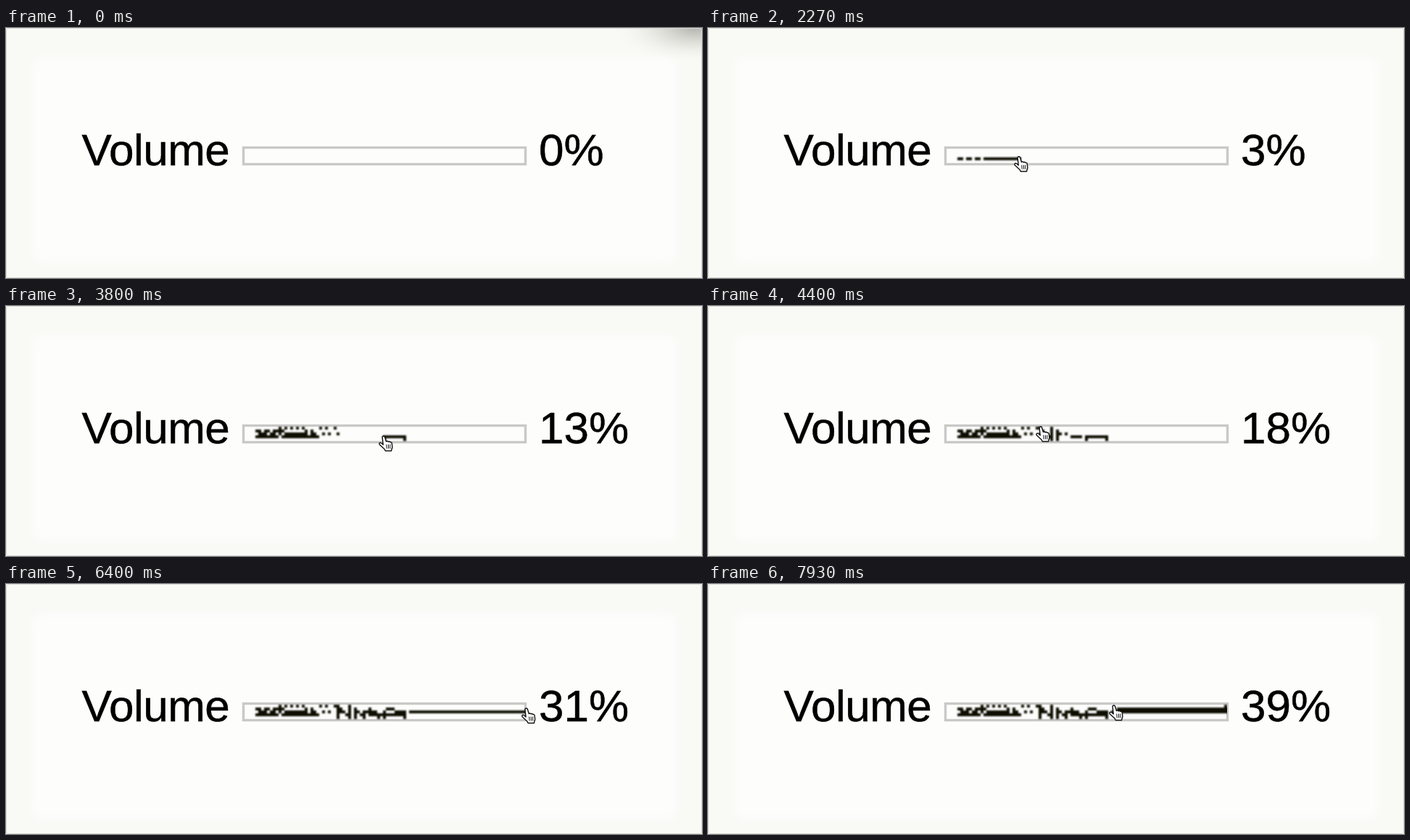
An HTML page for the animation above (8 s loop, 960x346 px).

```html
<!DOCTYPE html>
<html lang="en">
<head>
<meta charset="utf-8">
<title>Volume</title>
<style>
  html, body { margin: 0; width: 100%; height: 100%; overflow: hidden; background: #f9f9f6; }
  svg { display: block; width: 100%; height: 100%; }
  text { font: 62px "Liberation Sans", Arial, sans-serif; fill: #000; stroke: #000; stroke-width: .5; }
</style>
</head>
<body>
<svg viewBox="0 0 960 346">
  <defs>
    <filter id="soft"><feGaussianBlur stdDeviation="5"/></filter>
    <filter id="ink" filterUnits="userSpaceOnUse" x="320" y="160" width="404" height="36">
      <feGaussianBlur stdDeviation=".9"/>
    </filter>
    <radialGradient id="shade">
      <stop offset="0" stop-color="#b4b4b0"/>
      <stop offset=".45" stop-color="#dcdcd6" stop-opacity=".8"/>
      <stop offset="1" stop-color="#f4f4f0" stop-opacity="0"/>
    </radialGradient>
    <clipPath id="inside"><rect x="328" y="166" width="388" height="22"/></clipPath>
  </defs>
  <rect width="960" height="346" fill="#f9f9f6"/>
  <rect x="37" y="41" width="888" height="284" rx="12" fill="#fdfdfc" filter="url(#soft)"/>
  <ellipse id="corner" cx="950" cy="0" rx="112" ry="48" fill="url(#shade)"/>
  <rect x=".5" y=".5" width="959" height="345" rx="3" fill="none" stroke="#dcdcd6"/>
  <text x="104.5" y="190" letter-spacing="-.5">Volume</text>
  <rect x="327.5" y="165.5" width="389" height="23" fill="none" stroke="#c9c9c8" stroke-width="3.4"/>
  <g clip-path="url(#inside)"><path id="paint" fill="#080805" filter="url(#ink)"/></g>
  <text id="value" x="735" y="190">0%</text>
  <g id="hand" stroke="#111" stroke-width="1.4" stroke-linejoin="round" stroke-linecap="round">
    <path fill="#fff" d="M6 2q2-2 3.4 0l2 6.5q1.6-1.2 2.8.4q1.6-1 2.6.6q2-.6 2.4 1.4l.6 4.6q.2 2-.8 3.4l-.4 2.6h-8.4l-1-2.2-7-6.6q-1-2 1-2.4q1.4-.2 4 2.6z"/>
    <path fill="none" stroke-width="1" d="M11.8 13l.4 5M14.4 13l.2 5M16.8 13v5"/>
  </g>
</svg>
<script>
const LOOP = 8000;
const CELL = 4;
const $ = id => document.getElementById(id);
const keys = [[600, 905, -30]];
const stamps = [];

const snap = (v, origin) => origin + Math.round((v - origin) / CELL) * CELL;

// Moves the pointer; a gap fills grid cells that far apart.
function to(time, x, y, gap = 0) {
  const [t0, x0, y0] = keys[keys.length - 1];
  if (gap) {
    const n = Math.max(1, Math.round(Math.hypot(x - x0, y - y0) / gap));
    const w = gap > 9 ? 2 * CELL : CELL;
    for (let i = 0; i <= n; i++) {
      const k = i / n;
      const cx = snap(x0 + (x - x0) * k, 346), cy = snap(y0 + (y - y0) * k, 169);
      stamps.push({
        t: t0 + (time - t0) * k,
        d: `M${cx - CELL / 2} ${cy - CELL / 2}h${w}v${CELL}h${-w}z`
      });
    }
  }
  keys.push([time, x, y]);
}

// Scribbles to x between two heights.
function zig(time, x, top, bottom, turns, gap) {
  const [t0, x0] = keys[keys.length - 1];
  for (let i = 1; i <= turns; i++) {
    const k = i / turns;
    to(t0 + (time - t0) * k, x0 + (x - x0) * k, i % 2 ? top : bottom, gap);
  }
}

to(1150, 640, 60);
to(1600, 360, 174);
to(1730, 341, 180);
to(1850, 346, 181);
to(2130, 382, 181, 12);
to(2150, 389, 181);
to(2270, 428, 181, 3);
to(2340, 430, 180, 2);
to(2490, 390, 177, 3);
zig(2700, 347, 173, 179, 3, 3);
zig(2930, 381, 179, 172, 5, 3);
to(2960, 376, 169);
to(3020, 410, 169, 9);
zig(3090, 430, 179, 172, 3, 4);
to(3110, 434, 169);
to(3150, 452, 169, 9);
to(3170, 436, 177);
to(3215, 458, 177, 9);
to(3270, 514, 180);
to(3480, 550, 184);
to(3560, 550, 182, 3);
to(3800, 520, 183, 3);
to(3900, 503, 182, 4);
to(3990, 487, 175, 8);
to(4040, 481, 173);
to(4100, 481, 184, 3);
to(4190, 473, 169);
to(4280, 472, 183, 3);
to(4400, 458, 170, 4);
to(4490, 458, 184, 4);
to(4580, 473, 169);
to(4640, 481, 173);
zig(5020, 526, 183, 173, 4, 4);
to(5150, 550, 178, 3);
to(5270, 534, 181, 3);
to(5380, 558, 177);
to(5530, 606, 177, 3);
to(6380, 718, 177, 3);
to(6450, 714, 170, 3);
to(6500, 712, 173, 3);
to(6930, 584, 173, 3);
to(7150, 566, 173, 3);
to(7350, 536, 176);
to(7600, 575, 179);
to(7800, 605, 176);
to(7930, 559, 171);

const levels = [
  [1850, 0], [2270, 3], [3215, 11], [3480, 11], [4400, 18], [5380, 24],
  [5530, 25], [6380, 31], [6500, 31], [7150, 39]
];

function sample(list, t, column) {
  const i = list.findIndex(p => p[0] > t);
  if (i < 0) return list[list.length - 1][column];
  if (i === 0) return list[0][column];
  const a = list[i - 1], b = list[i];
  return a[column] + (b[column] - a[column]) * (t - a[0]) / (b[0] - a[0]);
}

function draw(t) {
  const x = sample(keys, t, 1), y = sample(keys, t, 2);
  $("hand").setAttribute("transform", `translate(${x - 7} ${y - 4})`);
  $("paint").setAttribute("d", stamps.filter(s => s.t <= t).map(s => s.d).join(""));
  $("value").textContent = Math.floor(sample(levels, t, 1) + 0.001) + "%";
  $("corner").setAttribute("opacity", Math.max(0, Math.min(1, (200 - t) / 130)));
}

let start;
function tick(now) {
  start ??= now;
  draw((now - start) % LOOP);
  requestAnimationFrame(tick);
}
draw(0);
requestAnimationFrame(tick);
</script>
</body>
</html>
```
